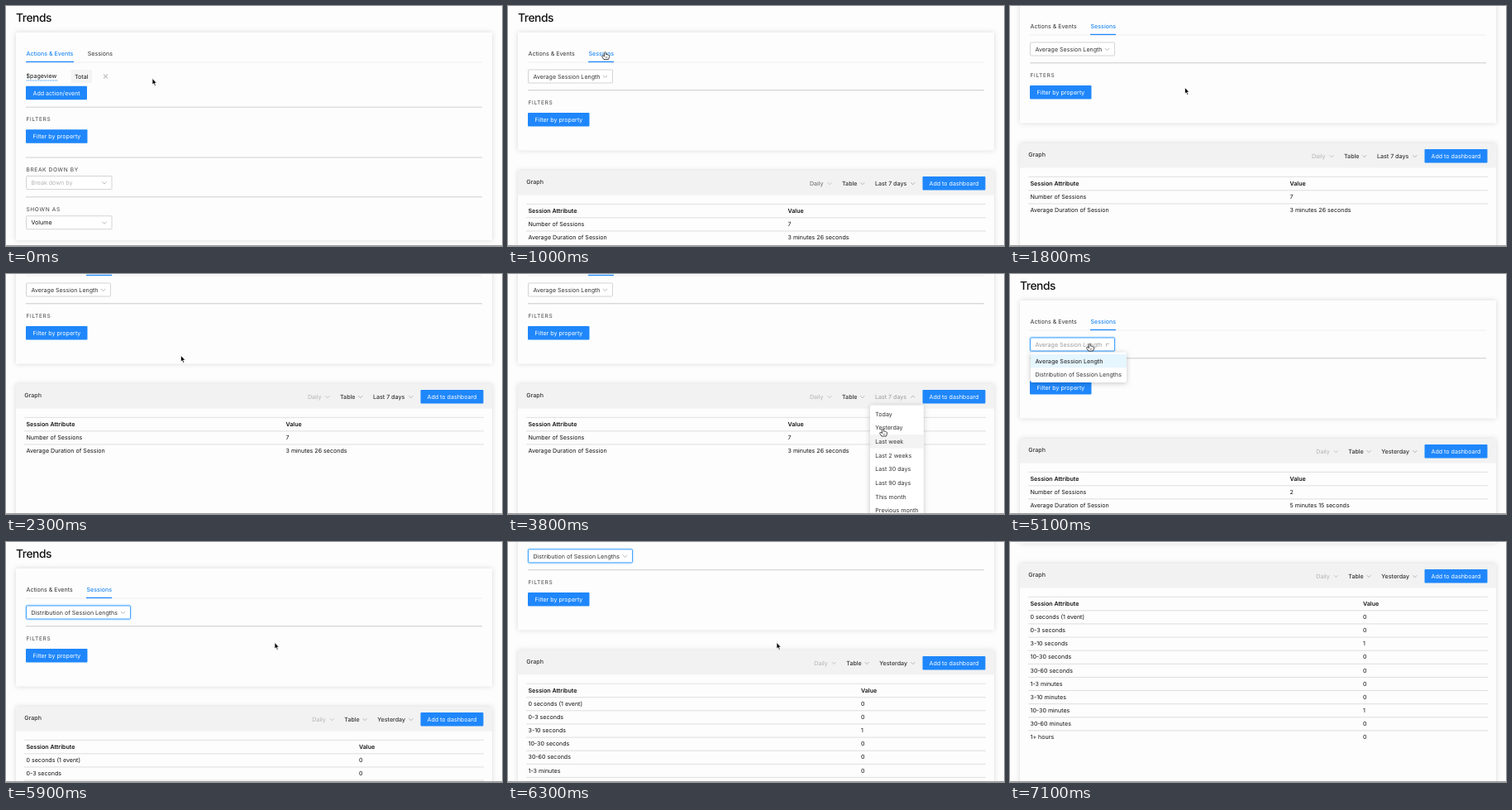
Recreate the animation shown at these times as an HTML page. Size 600 by 290 pixels, loop 7.4 s.

```html
<!DOCTYPE html>
<html lang="en">
<head>
<meta charset="utf-8">
<title>Trends</title>
<style>
html, body { margin: 0; width: 100%; height: 100%; overflow: hidden; background: #fdfdfd; }
svg { display: block; width: 600px; height: 290px; }
text { font: 7.1px Inter, "Open Sans", sans-serif; fill: #333; text-rendering: geometricPrecision; }
.title { font-size: 13.8px; font-weight: 500; letter-spacing: -.45px; fill: #111; }
.label { font-size: 6.6px; letter-spacing: .62px; fill: #444; }
.dark { fill: #111; }
.mid { font-weight: 500; }
.bold { font-weight: 600; fill: #111; }
.pale { fill: #b3b3b3; }
.grey { fill: #999; }
.soft { fill: #666; }
.white { fill: #fff; }
.blue { fill: #1f88f5; }
.card { fill: #fdfdfd; filter: drop-shadow(0 0 3px rgba(0,0,0,.14)); }
.menu { fill: #fff; filter: drop-shadow(0 1px 3px rgba(0,0,0,.22)); }
.focus { filter: drop-shadow(0 0 1px #1890ff88); }
</style>
</head>
<body>
<svg id="stage" viewBox="0 0 600 290"></svg>
<script>
const LOOP = 7400, STEP = 100;
const BLUE = '#1f87fb';
const stage = document.getElementById('stage');

// Cursor tip: time, x, y
const cursorPath = [
  [0, 177, 87.5], [400, 117.5, 55.5], [1100, 117.5, 55.5], [1400, 211.5, 98.5],
  [2600, 211.5, 98.5], [2900, 470, 148.5], [3200, 470, 148.5], [3600, 456, 200],
  [3700, 456, 200], [3800, 453.5, 187], [4400, 453.5, 187], [4900, 96.5, 84],
  [5200, 96.5, 84], [5400, 101, 118], [5500, 101, 118], [5900, 325, 121.5],
  [6900, 325, 121.5], [7000, 336, 95]
];
const scrollPath = [
  [0, 0], [1500, 0], [2100, 66], [4400, 66], [4900, 0], [6000, 0], [6700, 173]
];
const handTimes = [[600, 1200], [2900, 4000], [4900, 5600]];

const periods = ['Today', 'Yesterday', 'Last week', 'Last 2 weeks', 'Last 30 days',
  'Last 90 days', 'This month', 'Previous month'];
const buckets = ['0 seconds (1 event)', '0-3 seconds', '3-10 seconds', '10-30 seconds',
  '30-60 seconds', '1-3 minutes', '3-10 minutes', '10-30 minutes', '30-60 minutes', '1+ hours'];

const within = (t, a, b) => t >= a && t < b;

function along(path, t) {
  const i = path.findIndex(p => p[0] > t);
  if (i < 0) return path[path.length - 1].slice(1);
  const a = path[i - 1], b = path[i];
  const u = (t - a[0]) / (b[0] - a[0]), k = u * u * (3 - 2 * u);
  return a.slice(1).map((v, n) => v + (b[n + 1] - v) * k);
}

// y is the middle of the capitals
const text = (x, y, s, cls = '') =>
  `<text x="${x}" y="${y + (cls === 'title' ? 5 : 2.6)}" class="${cls}">${s}</text>`;
const box = (x, y, w, h, fill, extra = '') =>
  `<rect x="${x}" y="${y}" width="${w}" height="${h}" fill="${fill}" ${extra}/>`;
const rule = (y, x = 24, w = 552, color = '#cfcfcf', h = 1) => box(x, y, w, h, color);
const button = (x, y, w, s, dx = 8.5) =>
  box(x, y, w, 16.5, BLUE, 'rx="1"') + text(x + dx, y + 8.2, s, 'white');
const chevron = (x, y, turn = 0, color = '#aaa') =>
  `<path d="M-2.5-1.3L0 1.4L2.5-1.3" transform="translate(${x} ${y}) rotate(${turn})" fill="none" stroke="${color}" stroke-width=".8"/>`;

function select(y, w, s, cls, focus, turn) {
  return box(24.5, y, w, 16, '#fff',
    `rx="1" stroke="${focus ? '#46a6ff' : '#d4d4d4'}" ${focus ? 'class="focus"' : ''}`) +
    text(30.5, y + 8, s, cls) + chevron(24.5 + w - 9, y + 8.2, turn);
}

function tabs(t) {
  const second = t >= 900;
  const k = Math.min(1, Math.max(0, (t - 800) / 200));
  return text(24.5, 57, 'Actions &amp; Events', second ? '' : 'blue mid') +
    (second ? text(97.5, 57, 'Sessions', 'blue mid')
            : text(98.8, 57, 'Sessions', t >= 600 ? 'blue' : '')) +
    rule(67.5, 24, 552, '#f0f0f0') +
    box(24 + 73 * k, 66.8, 58 - 27 * k, 1.3, BLUE);
}

function eventsPanel() {
  return text(24.5, 84, '$pageview', 'dark') +
    '<path d="M25 90H62" stroke="#1f88f5" stroke-dasharray="1 1"/>' +
    box(78.5, 77, 25.5, 16, '#f4f4f4', 'rx="1"') + text(83, 85, 'Total', 'dark') +
    '<path d="M118 82.5l5 5m0-5l-5 5" stroke="#c4c4c4" stroke-width="1.1"/>' +
    button(24, 96.8, 74, 'Add action/event') + rule(121.7) +
    text(24.5, 136.5, 'FILTERS', 'label') + button(24, 149.2, 74.5, 'Filter by property') +
    rule(182.5) + text(24.5, 197, 'BREAK DOWN BY', 'label') +
    select(205.5, 103.5, 'Break down by', 'pale') +
    rule(230.3) + text(24.5, 245, 'SHOWN AS', 'label') +
    select(253.7, 103.5, 'Volume', 'dark');
}

function sessionsPanel(t) {
  const open = within(t, 5100, 5500), spread = t >= 5500;
  const name = spread ? 'Distribution of Session Lengths' : 'Average Session Length';
  const turn = open ? (t < 5200 ? 135 : 180) : 0;
  return select(77, spread ? 126 : 102, name, open ? 'grey' : '', t >= 5000, turn) +
    rule(101, 24, 552, '#d8d8d8', 1.4) +
    text(24.5, 116.5, 'FILTERS', 'label') + button(24, 129, 74.5, 'Filter by property');
}

function lengthMenu(t) {
  const second = t >= 5400;
  return box(25, 94.5, 116, 36.5, '#fff', 'rx="2" class="menu"') +
    box(25, 97, 116, 16.2, second ? '#fafafa' : '#e6f6ff') +
    (second ? box(25, 113.2, 116, 16.2, '#f3f3f3') : '') +
    text(30.5, 105.2, 'Average Session Length', 'mid') +
    text(30.5, 121.5, 'Distribution of Session Lengths');
}

function graph(t) {
  const yesterday = t >= 4000, open = within(t, 3100, 4000), spread = t >= 5600;
  const dx = yesterday ? 5.3 : 0;
  let rows = [['Number of Sessions', 7], ['Average Duration of Session', '3 minutes 26 seconds']];
  if (spread) rows = buckets.map((b, i) => [b, i === 2 || i === 7 ? 1 : 0]);
  else if (t >= 4200) rows = [[rows[0][0], 2], [rows[1][0], '5 minutes 15 seconds']];
  const valueX = spread ? 427 : 338.5;

  let s = box(12, 199, 576, 330, '#fdfdfd', 'class="card"') +
    box(12, 199, 576, 29.5, '#f2f2f2') + text(22.3, 212, 'Graph', 'mid') +
    text(365 + dx, 214.2, 'Daily', t < 1100 ? 'soft' : 'pale') + chevron(389 + dx, 214.4, 0, '#bbb') +
    text(404 + dx, 214.2, 'Table', 'mid') + chevron(428.8 + dx, 214.4) +
    text(444 + dx, 214.2, yesterday ? 'Yesterday' : 'Last 7 days', open ? 'grey' : 'mid') +
    chevron(489.8, 214.4, open ? 180 : 0) +
    button(501.5, 206, 76, 'Add to dashboard', 8) +
    rule(238.8, 22, 556, '#e0e0e0') +
    text(24.5, 247.4, 'Session Attribute', 'bold') + text(valueX, 247.4, 'Value', 'bold');
  rows.forEach(([name, value], i) => {
    const y = 263.5 + 16.12 * i;
    s += rule(y - 8.2, 22, 556, '#dedede') + text(24.5, y, name, 'dark') + text(valueX, y, value, 'dark');
  });
  return s;
}

function periodMenu(t) {
  const hover = t >= 3900 ? 1 : 2;
  return box(438, 224.5, 64.8, 160, '#fff', 'rx="2" class="menu"') +
    box(438, 226.9 + 16.62 * hover, 64.8, 16.6, '#f3f3f3') +
    periods.map((p, i) => text(444.3, 235.2 + 16.62 * i, p)).join('');
}

function cursor(t) {
  if (t >= 7100) return '';
  const [x, y] = along(cursorPath, t);
  const hand = handTimes.some(([a, b]) => within(t, a, b));
  const shape = hand
    ? '<path d="M-1 .8Q0-.4 1 .8V3.2Q2 2.6 2.6 3.4Q3.6 3 4 3.9Q5 3.7 5 4.8V6.3L4 9H-1.6L-3.8 5.6Q-4-.1 4.4-2.4 4.3L-1 5.6Z" fill="#fff" stroke="#222" stroke-width=".8"/><path d="M.8 5.7V7.6M2.4 5.7V7.6" stroke="#222" stroke-width=".5"/>'
        .replace('Q-4-.1 4.4-2.4 4.3', 'Q-3.9 4.2-2.4 4.3')
    : '<path d="M0 0V7.6L1.7 6.1L2.9 8.9L4.2 8.3L3 5.6H5.3Z" stroke="#fff" stroke-width=".7"/>';
  return `<g transform="translate(${x} ${y})">${shape}</g>`;
}

function draw(t) {
  const sessions = t >= 900;
  stage.innerHTML =
    `<g transform="translate(0 ${-along(scrollPath, t)[0]})">` +
    text(12, 13.7, 'Trends', 'title') +
    box(12, 32, 576, sessions ? 142.5 : 251, '#fdfdfd', 'class="card"') +
    tabs(t) +
    (sessions ? sessionsPanel(t) + graph(t) : eventsPanel()) +
    (within(t, 3100, 4000) ? periodMenu(t) : '') +
    (within(t, 5100, 5500) ? lengthMenu(t) : '') +
    '</g>' + cursor(t) + box(0, 289, 600, 1, '#999');
}

let last = -1;
function tick() {
  const t = Math.floor(performance.now() % LOOP / STEP) * STEP;
  if (t !== last) draw(last = t);
  requestAnimationFrame(tick);
}
tick();
</script>
</body>
</html>
```
